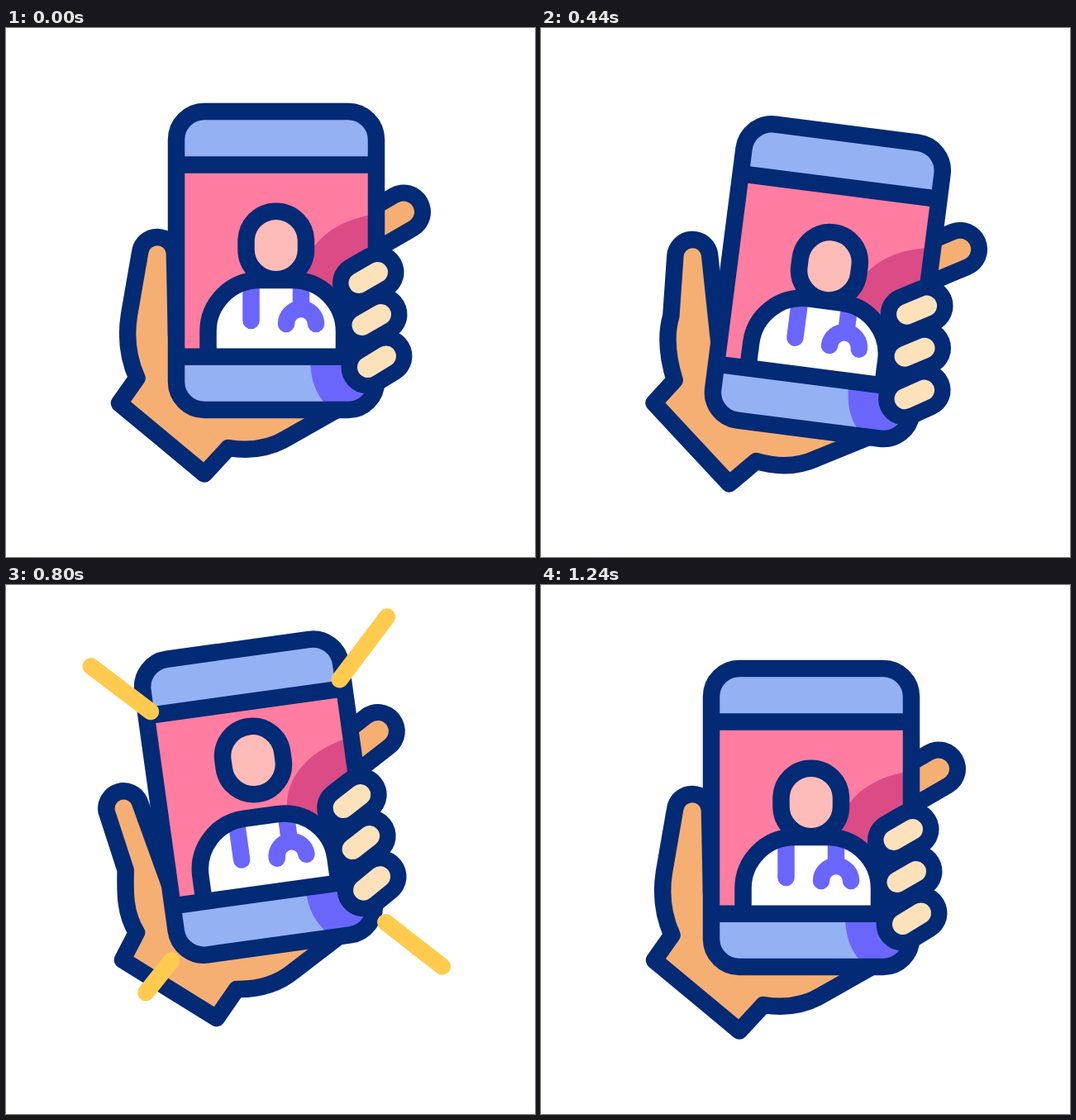
Animation, 640 px wide and 640 px high, one loop 1.44 s. Source, as an HTML page:

```html
<!DOCTYPE html>
<html lang="en">
<head>
<meta charset="utf-8">
<title>Phone in hand</title>
<style>
  html, body { margin: 0; width: 100%; height: 100%; overflow: hidden; background: #fff; }
  svg { display: block; width: 100%; height: 100%; }
  .ink { stroke: #032a75; stroke-width: 20.5; stroke-linejoin: round; }
  .line { fill: none; stroke-linecap: round; }
</style>
</head>
<body>
<svg viewBox="0 0 640 640">
  <defs>
    <clipPath id="face"><rect x="206" y="101" width="242" height="361" rx="34"/></clipPath>
  </defs>
  <g id="scene">
    <path id="palm" class="ink" fill="#f6af73"/>
    <g class="line">
      <path d="M481 222.5L437 248" stroke="#032a75" stroke-width="66"/>
      <path d="M481 222.5L437 248" stroke="#f6af73" stroke-width="26"/>
    </g>

    <g clip-path="url(#face)">
      <rect x="206" y="101" width="242" height="361" fill="#94b1f3"/>
      <path d="M368 398C368 424 374 440 385 453V470H448V398Z" fill="#6b66fb"/>
      <rect x="206" y="165" width="242" height="233" fill="#ff7da0"/>
      <path d="M448 225C405 231 364 255 359 300V398H448Z" fill="#db4b85"/>
    </g>

    <path d="M244.500 398V367A62 62 0 0 1 306.500 305H347A62 62 0 0 1 409 367V398Z" fill="#fff"/>
    <path class="line" stroke="#6b66fb" stroke-width="20.500"
      d="M296.500 310V354M357 310V340M339 358A18 18 0 0 1 375 358"/>
    <path class="ink" fill="none" d="M244.500 398V367A62 62 0 0 1 306.500 305H347A62 62 0 0 1 409 367V398"/>
    <rect id="head" class="ink" x="290.500" y="221.700" width="72.500" height="82.500" rx="36.250" fill="#fdbcb8"/>

    <path class="ink" d="M206 165.500H448M206 397.700H448"/>
    <rect class="ink" x="206" y="101" width="242" height="361" rx="34" fill="none"/>

    <g id="fingers" class="line"></g>
    <g id="rays" class="line" stroke="#ffcb4f" stroke-width="20.500"></g>
  </g>
</svg>
<script>
const LOOP = 1440, STEP = 40;
const $ = id => document.getElementById(id);

function addPath(parent, attrs) {
  const path = document.createElementNS('http://www.w3.org/2000/svg', 'path');
  for (const name in attrs) path.setAttribute(name, attrs[name]);
  return parent.appendChild(path);
}

const knuckles = ['M427 308.5L449.5 295.5', 'M431 359.5L453.5 346.5', 'M437.5 410.5L459.5 397'];
for (const [color, width] of [['#032a75', 64], ['#fde1bb', 25]]) {
  for (const d of knuckles) addPath($('fingers'), { d, stroke: color, 'stroke-width': width });
}

// x, y: inner end; dx, dy: full travel; tip, tail: time spans of both ends
const rays = [
  { x: 253, y: 202, dx: -105, dy: -105, tip: [560, 800], tail: [680, 970] },
  { x: 401, y: 197, dx: 110, dy: -110, tip: [560, 800], tail: [680, 970] },
  { x: 244, y: 417, dx: -102, dy: 97, tip: [595, 860], tail: [680, 930] },
  { x: 420, y: 413, dx: 99, dy: 102, tip: [560, 800], tail: [680, 970] }
];
for (const ray of rays) ray.path = addPath($('rays'), {});

const clamp = v => Math.min(1, Math.max(0, v));
const smooth = p => (1 - Math.cos(Math.PI * p)) / 2;

function tween(t, ...keys) {
  if (t <= keys[0][0]) return keys[0][1];
  for (let i = 1; i < keys.length; i++) {
    const [t0, v0] = keys[i - 1], [t1, v1] = keys[i];
    if (t < t1) return v0 + (v1 - v0) * smooth((t - t0) / (t1 - t0));
  }
  return keys[keys.length - 1][1];
}

// half linear, half smooth
function glide(t, [from, to]) {
  const p = clamp((t - from) / (to - from));
  return (p + smooth(p)) / 2;
}

// bend turns the thumb tip, flex shifts the side of the thumb's root
function palmPath(bend, flex) {
  const a = bend * Math.PI / 180, c = Math.cos(a), s = Math.sin(a);
  const turn = (x, y) => {
    const dx = x - 167, dy = y - 379;
    return (167 + dx * c - dy * s).toFixed(2) + ' ' + (379 + dx * s + dy * c).toFixed(2);
  };
  return `M206 372L${turn(203.9, 272)}A21 21 0 0 0 ${turn(162.2, 271)}L${149 + flex} 347` +
    `C${145 + flex} 372 147 398 158.5 423.5L137 454L240 539.5L269 508` +
    'C300 513 322 507 340 496L400 462L300 400Z';
}

function draw(t) {
  const lift = tween(t, [120, 0], [400, 25], [720, -27], [1240, 0]);
  const tilt = tween(t, [160, 0], [480, 7.6], [750, -7.9], [820, -7.9], [1240, 0]);
  const bend = tween(t, [240, 0], [560, -17.2], [620, -17.2], [1040, 0]);
  const flex = tween(t, [240, 0], [480, -5], [840, 7], [1200, 0]);
  const hop = tween(t, [580, 0], [840, -28], [1220, 0]);

  $('scene').setAttribute('transform', `translate(0 ${lift}) rotate(${tilt} 320 438)`);
  $('palm').setAttribute('d', palmPath(bend, flex));
  $('head').setAttribute('transform', `translate(0 ${hop})`);

  for (const { x, y, dx, dy, tip, tail, path } of rays) {
    const end = glide(t, tip), start = glide(t, tail);
    const at = p => `${x + dx * p} ${y + dy * p}`;
    path.setAttribute('d', end - start > 0.001 ? `M${at(start)}L${at(end)}` : '');
  }
}

function tick(now) {
  draw(Math.floor(now % LOOP / STEP) * STEP);
  requestAnimationFrame(tick);
}

draw(0);
requestAnimationFrame(tick);
</script>
</body>
</html>
```
